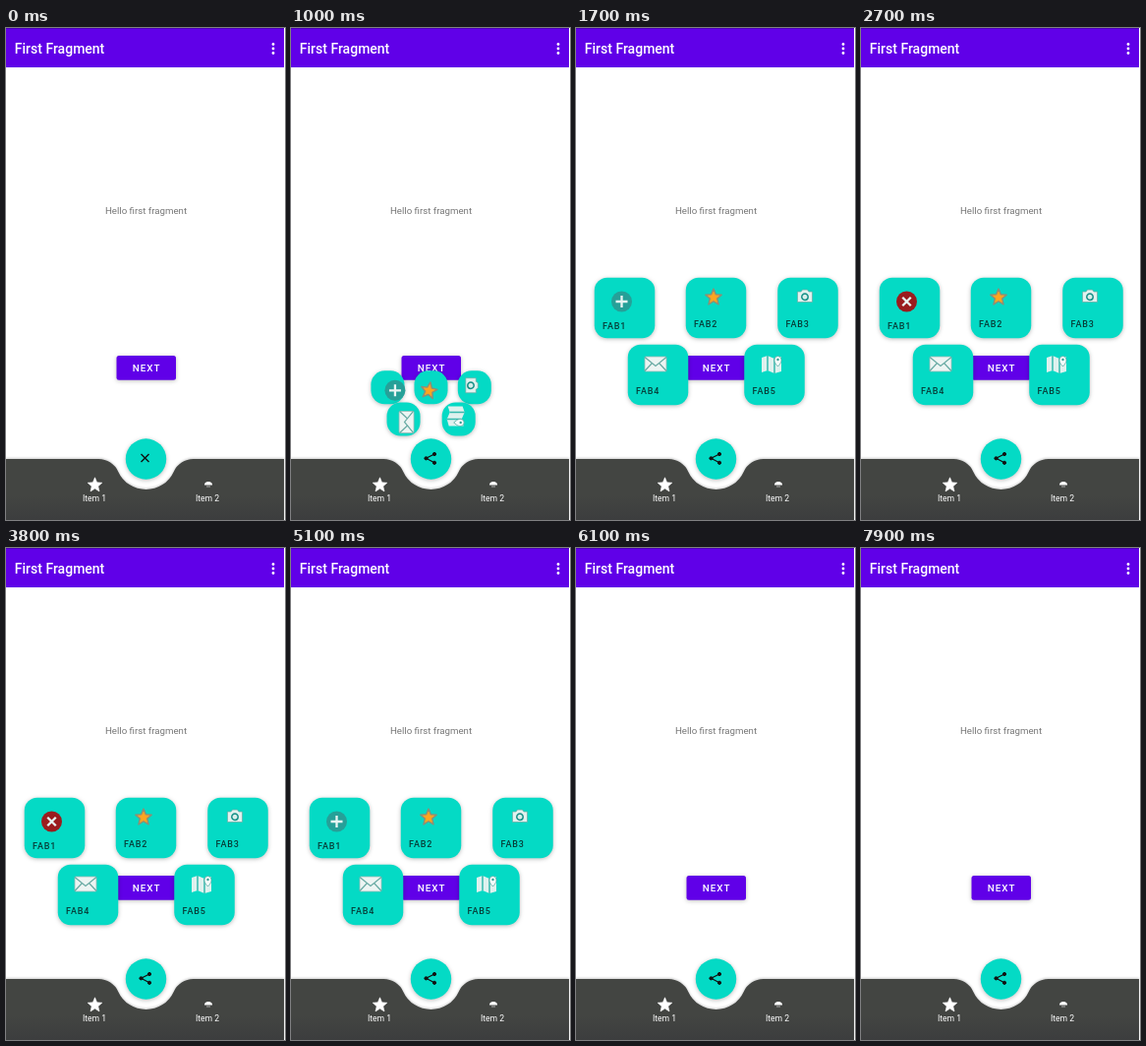
Recreate the animation shown at these times as an HTML page. Size 284 by 500 pixels, loop 8000 ms.

```html
<!DOCTYPE html>
<html lang="en">
<head>
<meta charset="utf-8">
<style>
  html, body { margin: 0; width: 100%; height: 100%; overflow: hidden; background: #fff; }
  svg { display: block; width: 284px; height: 500px; font-family: Roboto, sans-serif; filter: blur(.4px); }
  .medium { font-weight: 500; }
  .shadow { filter: drop-shadow(0 1.5px 2px rgba(0, 0, 0, .26)); }
</style>
</head>
<body>
<svg viewBox="0 0 284 500">
  <defs>
    <linearGradient id="barFill" x2="0" y2="1">
      <stop offset=".6" stop-color="#434542"/>
      <stop offset="1" stop-color="#3c3d3e"/>
    </linearGradient>
    <path id="star" d="M0-7.5 2.1-2.5 7.3-2.1 3.3 1.4 4.5 6.6 0 3.8-4.5 6.6-3.3 1.4-7.3-2.1-2.1-2.5Z"/>
    <g id="icon-star">
      <use href="#star" transform="scale(1.12)" fill="#ffa51f" stroke="#8b8f78" stroke-width="1.3" stroke-linejoin="round"/>
    </g>
    <g id="icon-camera">
      <path d="M-7.5-4.5H-4L-2.5-6.5H2.5L4-4.5H7.5V6H-7.5Z" fill="#e2f1ee" stroke="#6aa9a2" stroke-width=".7"/>
      <circle cy=".8" r="3.2" fill="#d8efeb" stroke="#148f86" stroke-width="1.5"/>
    </g>
    <g id="icon-mail" stroke="#9db9b5" stroke-width=".8">
      <rect x="-11" y="-7.5" width="22" height="15" rx="1" fill="#edf5f3"/>
      <path d="M-11-7 0 2 11-7M-11 7-3.5-1M11 7 3.5-1" fill="none" stroke="#67aaa3" stroke-width="1.2"/>
    </g>
    <g id="icon-map">
      <path d="M-10-7-4-9 3-6 10-8V7L3 9-4 6-10 8Z" fill="#dff1ee"/>
      <path d="M-4-9V6M3-6V9" stroke="#35b9ad" stroke-width="1.5"/>
      <path d="M6.5 2C3-2 3-3 3-5A3.5 3.5 0 0 1 10-5C10-3 10-2 6.5 2Z" fill="#f4fbfa" stroke="#53aaa1" stroke-width=".8"/>
      <circle cx="6.5" cy="-5" r="1.2" fill="#349f96"/>
    </g>
    <g id="icon-plus">
      <circle id="plusDisc" r="10.5"/>
      <path id="plusMark" d="M-6 0H6M0-6V6" stroke="#e9f5f3" stroke-width="2.3"/>
    </g>
  </defs>

  <rect width="283" height="40" fill="#6000e8"/>
  <rect width="283" height="1" fill="#4a00b6"/>
  <text class="medium" x="8.8" y="26.3" font-size="14" fill="#fff">First Fragment</text>
  <g fill="#fff">
    <circle cx="272" cy="16.5" r="1.4"/><circle cx="272" cy="21" r="1.4"/><circle cx="272" cy="25.5" r="1.4"/>
  </g>
  <text x="142.5" y="188.5" font-size="9.7" fill="#777" text-anchor="middle">Hello first fragment</text>

  <rect class="shadow" x="112.5" y="333" width="60.5" height="24.7" rx="2.5" fill="#6000e8"/>
  <text class="medium" x="128.8" y="349" font-size="9.9" letter-spacing=".95" fill="#fff">NEXT</text>

  <path d="M0 438H94.3A22 22 0 0 1 114.3 450.9A31 31 0 0 0 170.7 450.9A22 22 0 0 1 190.7 438H283V500H0Z"
        fill="url(#barFill)" style="filter:drop-shadow(0 -1px 1px rgba(0,0,0,.2))"/>
  <g fill="#fff" font-size="8.6" text-anchor="middle">
    <use href="#star" x="90.5" y="464.3" stroke="#fff" stroke-width=".6"/>
    <text x="90" y="480.5">Item 1</text>
    <path d="M202 464.5A4 3.5 0 0 1 210 464.5Z"/>
    <path d="M204 466H208" stroke="#aaa"/>
    <text x="205" y="480.5">Item 2</text>
  </g>

  <g id="fabs"></g>

  <circle class="shadow" cx="142.5" cy="438" r="20.7" fill="#04dac5"/>
  <g id="share" fill="#111" stroke="#111">
    <path d="M146 433 137.5 437.3 146 441.8" fill="none" stroke-width="1.2"/>
    <circle cx="146" cy="433" r="1.6"/><circle cx="137.5" cy="437.3" r="1.6"/><circle cx="146" cy="441.8" r="1.6"/>
  </g>
  <path id="cross" d="M137.5 433 145.5 441M145.5 433 137.5 441" stroke="#111" stroke-width="1.4"/>
</svg>

<script>
const LOOP = 8000;
const HOME = { x: 142.5, y: 438 };
const $ = id => document.getElementById(id);
const clamp = v => Math.min(1, Math.max(0, v));
const lerp = (a, b, k) => a + (b - a) * k;
const ease = v => v * v * (3 - 2 * v);
const ramp = (t, start, length) => ease(clamp((t - start) / length));

// Open centre, icon offset while compact and while expanded, icon turn while compact
const fabs = [
  { icon: 'plus',   x: 49.5,  y: 284.5, from: [7.5, 3], to: [-3, -6.5],  turn: 0 },
  { icon: 'star',   x: 142.5, y: 284.5, from: [-2, 3],  to: [-2.5, -11], turn: 10 },
  { icon: 'camera', x: 236,   y: 284.5, from: [-3, -2], to: [-3, -12],   turn: 90 },
  { icon: 'mail',   x: 83.5,  y: 352.5, from: [3, 3],   to: [-2.5, -11], turn: 90 },
  { icon: 'map',    x: 202,   y: 352.5, from: [-3, -3], to: [-3, -10.5], turn: 90 }
];

$('fabs').innerHTML = fabs.map((fab, i) => `<g>
  <rect class="shadow" fill="#04dac5"/>
  <use href="#icon-${fab.icon}"/>
  <text class="medium" x="-22.5" y="${i ? 19.5 : 21}" font-size="9" letter-spacing=".8" fill="#073c37">FAB${i + 1}</text>
</g>`).join('');
fabs.forEach((fab, i) => {
  fab.group = $('fabs').children[i];
  [fab.box, fab.glyph, fab.label] = fab.group.children;
});

function set(node, attributes) {
  for (const name in attributes) node.setAttribute(name, attributes[name]);
}

function drawFab(fab, open) {
  const grow = clamp(open * 2 - 1);
  const size = lerp(34, 61.5, grow);
  set(fab.group, {
    transform: `translate(${lerp(HOME.x, fab.x, open)} ${lerp(HOME.y, fab.y, open)})`,
    visibility: open > 0 ? 'visible' : 'hidden'
  });
  set(fab.box, { x: -size / 2, y: -size / 2, width: size, height: size, rx: lerp(14, 13, grow) });
  const [x, y] = fab.from.map((v, axis) => lerp(v, fab.to[axis], grow));
  set(fab.glyph, { transform: `translate(${x} ${y}) rotate(${fab.turn * (1 - grow)})` });
  set(fab.label, { opacity: clamp(grow * 3 - 2) });
}

function mix(a, b, k) {
  return `rgb(${a.map((v, i) => Math.round(lerp(v, b[i], k)))})`;
}

function draw(t) {
  const open = ramp(t, 615, 800) - ramp(t, 5200, 800);
  fabs.forEach(fab => drawFab(fab, open));

  const checked = ramp(t, 2300, 200) - ramp(t, 4100, 200);
  set($('plusDisc'), { fill: mix([38, 160, 152], [155, 28, 30], checked) });
  set($('plusMark'), { transform: `rotate(${45 * checked})` });

  set($('cross'), { visibility: t < 100 ? 'visible' : 'hidden' });
  set($('share'), { visibility: t < 100 ? 'hidden' : 'visible' });
}

const start = performance.now();
function tick() {
  draw((performance.now() - start) % LOOP);
  requestAnimationFrame(tick);
}
tick();
</script>
</body>
</html>
```
